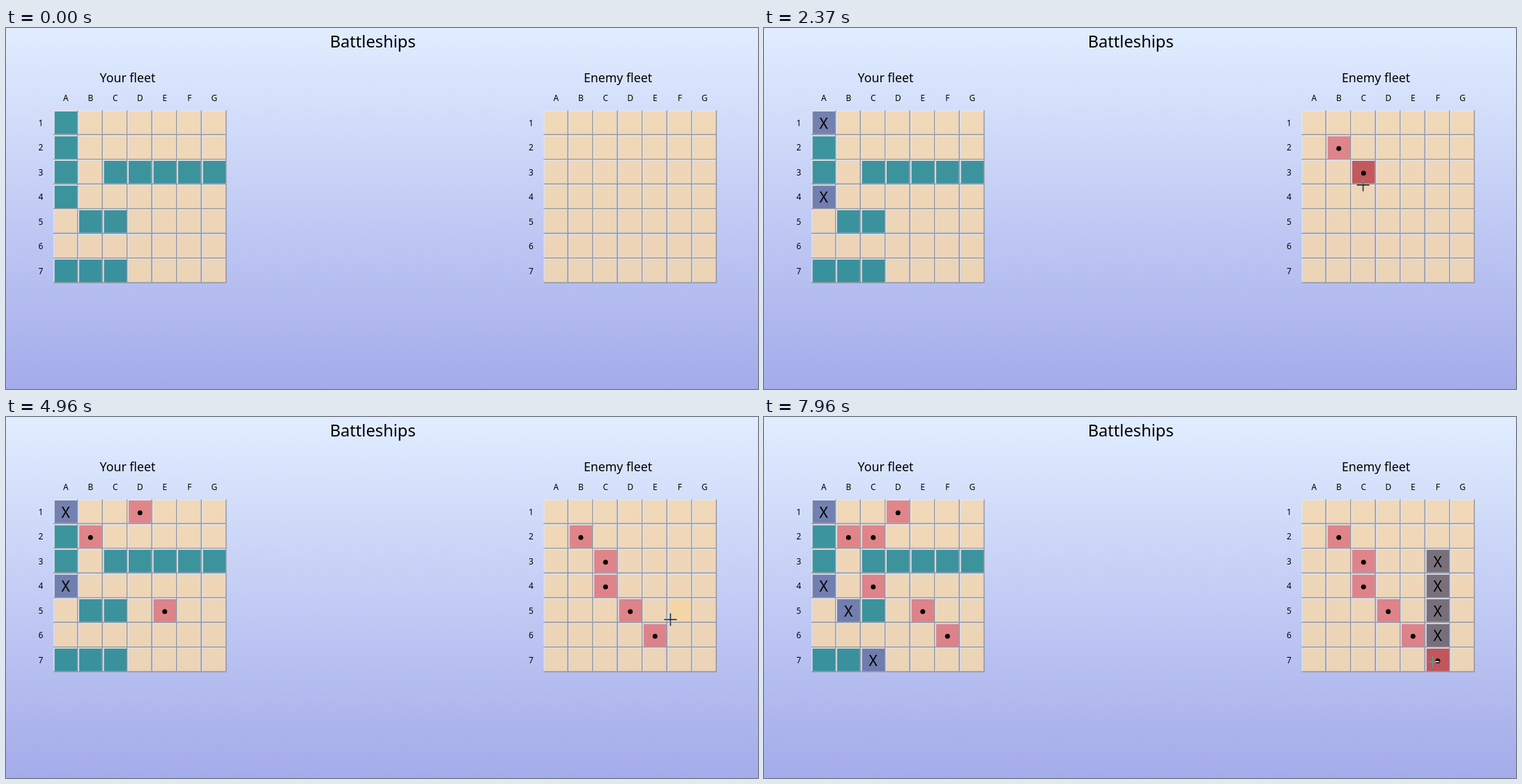
An HTML page with a canvas for the animation above (7.99 s loop, 1079 by 519 pixels).

```html
<!DOCTYPE html>
<html lang="en">
<head>
<meta charset="utf-8">
<title>Battleships</title>
<style>
  html, body { margin: 0; width: 100%; height: 100%; overflow: hidden; }
  canvas { display: block; }
</style>
</head>
<body>
<canvas id="stage" width="1079" height="519"></canvas>
<script>
const ctx = document.getElementById('stage').getContext('2d');
const W = 1079, H = 519, LOOP = 7990;
const SIZE = 7, PITCH = 35.5, MID = PITCH / 2, BORDER = 1.5;
const TOP = 118.5, OWN_X = 68, ENEMY_X = 771.5;
const COLUMNS = 'ABCDEFG';

// Pointer: enters from a corner, then glides to each target before the click
const ENTRY = { time: 90, x: 1044, y: 496 };
const LEAD = 550, GLIDE = 330, SWAY = 7;

const COLOR = {
  water: 'rgb(246,215,173)',
  ship: 'rgb(36,137,143)',
  hit: 'rgb(99,113,164)',
  miss: 'rgb(227,119,119)',
  missHover: 'rgb(195,69,65)',
  sunk: 'rgb(109,96,103)',
  waterHover: 'rgb(216,175,121)',
  shipHover: 'rgb(255,215,154)',
  light: '#e6e6e6',
  dark: '#8f8f8f'
};

const ownShips = 'A1 A2 A3 A4 C3 D3 E3 F3 G3 B5 C5 A7 B7 C7'.split(' ');
const enemyShips = 'F3 F4 F5 F6'.split(' ');

const turns = [
  { click: 910, shot: 'B2', reply: 'A1' },
  { click: 1720, shot: 'C3', reply: 'A4' },
  { click: 2835, shot: 'C4', reply: 'E5' },
  { click: 3700, shot: 'D5', reply: 'B2' },
  { click: 4360, shot: 'E6', reply: 'D1' },
  { click: 5360, shot: 'F5', reply: 'C2' },
  { click: 5850, shot: 'F4', reply: 'C4' },
  { click: 6450, shot: 'F3', reply: 'F6' },
  { click: 7090, shot: 'F6', reply: 'B5' },
  { click: 7740, shot: 'F7', reply: 'C7' }
];

const easeOut = k => 1 - (1 - k) ** 2;
const mix = (a, b, k) => a + (b - a) * k;

// The hand lands alternately right and left of the cell's middle
function aim(i) {
  if (i < 0) return ENTRY;
  const [column, row] = turns[i].shot;
  return {
    x: ENEMY_X + COLUMNS.indexOf(column) * PITCH + MID + SWAY * (-1) ** i,
    y: TOP + (row - 1) * PITCH + MID + 2.5
  };
}

const departure = i => i ? turns[i].click - LEAD : ENTRY.time;

function pointerAt(t) {
  const i = turns.filter((turn, n) => departure(n) <= t).length - 1;
  if (i < 0) return null;
  const from = aim(i - 1), to = aim(i);
  const k = easeOut(Math.min(1, (t - departure(i)) / GLIDE));
  return { x: mix(from.x, to.x, k), y: mix(from.y, to.y, k) };
}

function cellUnder(pointer) {
  if (!pointer) return null;
  const column = COLUMNS[Math.floor((pointer.x - ENEMY_X) / PITCH)];
  const row = Math.floor((pointer.y - 1 - TOP) / PITCH) + 1;
  return column + row;
}

function text(str, x, y, size) {
  ctx.font = size + 'px "Noto Sans", "Open Sans", sans-serif';
  ctx.fillStyle = '#000';
  ctx.fillText(str, x, y);
}

function rect(x, y, w, h, color) {
  ctx.fillStyle = color;
  ctx.fillRect(x, y, w, h);
}

function drawCell(x, y, color, mark) {
  const inner = PITCH - 2 * BORDER, far = PITCH - BORDER;
  ctx.globalAlpha = 0.85;
  rect(x + BORDER, y + BORDER, inner, inner, color);
  rect(x, y, far, BORDER, COLOR.light);
  rect(x, y + BORDER, BORDER, inner, COLOR.light);
  rect(x, y + far, PITCH, BORDER, COLOR.dark);
  rect(x + far, y, BORDER, far, COLOR.dark);
  ctx.globalAlpha = 1;
  if (mark === 'X') text('X', x + MID, y + 26, 21);
  if (mark === 'dot') {
    ctx.fillStyle = '#000';
    ctx.beginPath();
    ctx.arc(x + MID, y + 19.3, 3.5, 0, Math.PI * 2);
    ctx.fill();
  }
}

function drawBoard(left, title, colorOf, markOf) {
  text(title, left + 106.5, 77.5, 17.75);
  for (let i = 0; i < SIZE; i++) {
    text(COLUMNS[i], left + MID + i * PITCH, 105, 11.85);
    text(i + 1, left - 18, 140.5 + i * PITCH, 11.85);
  }
  for (let row = 0; row < SIZE; row++) {
    for (let col = 0; col < SIZE; col++) {
      const id = COLUMNS[col] + (row + 1);
      drawCell(left + col * PITCH, TOP + row * PITCH, colorOf(id), markOf(id));
    }
  }
}

function drawPointer({ x, y }) {
  ctx.globalCompositeOperation = 'difference';
  ctx.fillStyle = '#fff';
  ctx.beginPath();
  ctx.rect(x - 9, y - 0.75, 18, 1.5);
  ctx.rect(x - 0.75, y - 9, 1.5, 18);
  ctx.fill();
  ctx.globalCompositeOperation = 'source-over';
}

function draw(t) {
  const sky = ctx.createLinearGradient(0, 0, 0, H);
  sky.addColorStop(0, '#e1edff');
  sky.addColorStop(1, '#a4abea');
  rect(0, 0, W, H, sky);

  ctx.textAlign = 'center';
  text('Battleships', 526.2, 28, 23.67);

  const played = turns.filter(turn => turn.click <= t);
  const shots = played.map(turn => turn.shot);
  const replies = played.map(turn => turn.reply);
  const sunk = enemyShips.every(id => shots.includes(id));
  const pointer = pointerAt(t);
  const hover = cellUnder(pointer);
  const marker = (fired, ships) => id =>
    !fired.includes(id) ? '' : ships.includes(id) ? 'X' : 'dot';

  drawBoard(OWN_X, 'Your fleet', id => {
    const ship = ownShips.includes(id);
    if (replies.includes(id)) return ship ? COLOR.hit : COLOR.miss;
    return ship ? COLOR.ship : COLOR.water;
  }, marker(replies, ownShips));

  drawBoard(ENEMY_X, 'Enemy fleet', id => {
    const ship = enemyShips.includes(id), over = id === hover;
    if (shots.includes(id)) {
      if (ship) return sunk ? COLOR.sunk : COLOR.hit;
      return over ? COLOR.missHover : COLOR.miss;
    }
    if (!over) return COLOR.water;
    return ship ? COLOR.shipHover : COLOR.waterHover;
  }, marker(shots, enemyShips));

  if (pointer) drawPointer(pointer);
}

const start = performance.now();
function tick() {
  draw((performance.now() - start) % LOOP);
  requestAnimationFrame(tick);
}
tick();
</script>
</body>
</html>
```
